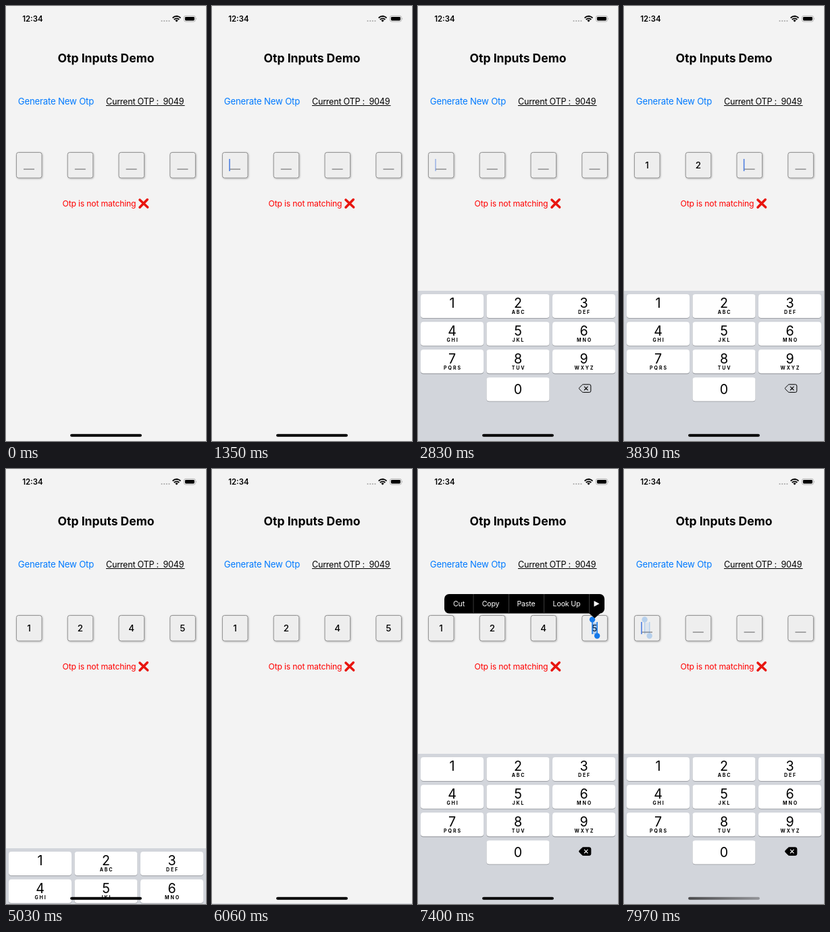
Write an HTML page that moves like this. It is 296 by 640 pixels and loops after 8000 ms.

```html
<!DOCTYPE html>
<html lang="en">
<head>
<meta charset="utf-8">
<title>Otp Inputs Demo</title>
<style>
  html, body { margin: 0; width: 100%; height: 100%; overflow: hidden; background: #f3f3f3; }
  svg { display: block; width: 296px; height: 640px; font-family: Inter, "Open Sans", sans-serif; }
  text { white-space: pre; }
  .mid { text-anchor: middle; }
</style>
</head>
<body>
<svg id="stage" viewBox="0 0 296 640" xmlns="http://www.w3.org/2000/svg">
  <defs>
    <filter id="soft" x="-20%" y="-20%" width="150%" height="150%">
      <feDropShadow dx=".8" dy=".8" stdDeviation=".9" flood-color="#000" flood-opacity=".28"/>
    </filter>
    <linearGradient id="dim">
      <stop offset="0" stop-color="#4a4a4c"/>
      <stop offset="1" stop-color="#939498"/>
    </linearGradient>
  </defs>
  <rect width="296" height="640" fill="#f3f3f3"/>

  <g id="status">
    <text x="24.2" y="23" font-size="11.4" font-weight="600">12:34</text>
    <g fill="#a9a9a9">
      <circle cx="230.5" cy="22" r="1.1"/><circle cx="234.2" cy="22" r="1.1"/>
      <circle cx="237.8" cy="22" r="1.1"/><circle cx="241.4" cy="22" r="1.1"/>
    </g>
    <g fill="none" stroke="#000" stroke-width="1.9">
      <path d="M246.6 17.6a8 8 0 0 1 11.8 0"/>
      <path d="M248.8 20a5 5 0 0 1 7.4 0"/>
    </g>
    <path d="M252.5 23.6l-2.1-2.2a3 3 0 0 1 4.2 0z"/>
    <rect x="263.4" y="14.4" width="17" height="8.6" rx="2.6" fill="none" stroke="#a6a6a6" stroke-width=".8"/>
    <rect x="264.9" y="15.9" width="14" height="5.6" rx="1.4"/>
    <path d="M281.4 17.2q1.6 1.5 0 3z" fill="#a6a6a6"/>
  </g>

  <text class="mid" x="148" y="83" font-size="17.5" font-weight="700">Otp Inputs Demo</text>
  <text x="17.8" y="145" font-size="13.2" letter-spacing="-.19" fill="#007aff">Generate New Otp</text>
  <text x="148" y="145" font-size="12.6" letter-spacing="-.25">Current OTP :  9049</text>
  <rect x="148" y="146" width="116.5" height="1"/>
  <text x="83.5" y="295" font-size="12.2" letter-spacing="-.17" fill="#f00">Otp is not matching</text>
  <path d="M198 285.2l11.6 10.8M209.2 284.8l-11.2 11.4" stroke="#e8150f" stroke-width="3.6" stroke-linecap="round"/>

  <g id="boxes"></g>

  <rect id="caret" y="225" width="1.6" height="18" fill="#4f7fe0"/>
  <g id="sel" fill="#1579ea">
    <rect x="258" y="226" width="7" height="17" opacity=".3"/>
    <rect x="257.2" y="222" width="1.5" height="21"/>
    <rect x="264.4" y="225" width="1.5" height="20"/>
    <circle cx="258" cy="221.5" r="4.2"/>
    <circle cx="265.1" cy="245.5" r="4.2"/>
  </g>

  <g id="menu">
    <rect x="39" y="184" width="237" height="28.5" rx="7"/>
    <path d="M253 212h17l-8.5 7.5z"/>
    <path d="M82 184v28.5M134.5 184v28.5M186.5 184v28.5M253.5 184v28.5" stroke="#484848" stroke-width=".8"/>
    <g class="mid" fill="#fff" font-size="10.6" letter-spacing="-.15">
      <text x="60.5" y="202">Cut</text>
      <text x="107.5" y="202">Copy</text>
      <text x="160" y="202">Paste</text>
      <text x="220" y="202">Look Up</text>
    </g>
    <path d="M260.5 194l8 4.3-8 4.3z" fill="#fff"/>
  </g>

  <g id="board">
    <rect y="419" width="296" height="221" fill="#d2d5db"/>
    <g id="keys"></g>
    <path id="erase" d="M244.4 556.8h9.2q2.2 0 2.2 2.2v7.2q0 2.2-2.2 2.2h-9.2q-.9 0-1.5-.7l-4-4.1q-.9-1 0-2l4-4.1q.6-.7 1.5-.7z" stroke="#000"/>
    <path id="cross" d="M246.3 560.2l4.8 4.8M251.1 560.2l-4.8 4.8" stroke-width="1.1" stroke-linecap="round"/>
  </g>
  <rect id="home" x="95.1" y="629.8" width="105.8" height="3.9" rx="1.95"/>
</svg>
<script>
const LOOP = 8000, BOARD_H = 221, PITCH = 75.8;
// Moments at which the screen refreshes; it holds still between them.
const TICKS = [0, 1350, 1460, 1570, 1680, 1790, 1900, 2170, 2290, 2830, 2950,
  3190, 3320, 3440, 3700, 3830, 4190, 4290, 4820, 4930, 5030, 5130, 5240, 5360,
  6060, 6200, 6310, 6430, 6530, 6640, 7400, 7520, 7630, 7740, 7850, 7970];

const $ = id => document.getElementById(id);
function add(parent, tag, attrs, text) {
  const el = document.createElementNS("http://www.w3.org/2000/svg", tag);
  for (const k in attrs) el.setAttribute(k, attrs[k]);
  if (text) el.textContent = text;
  return parent.appendChild(el);
}
const fade = (el, v) => el.setAttribute("opacity", v);

// Typed value, time it appears, time it is erased
const fields = [["1", 3320, 7850], ["2", 3830, 7740], ["4", 4290, 7630], ["5", 4930, 7520]]
  .map(([value, on, off], i) => {
    const g = add($("boxes"), "g", { transform: `translate(${15 + PITCH * i} 215)` });
    add(g, "rect", { x: .4, y: .4, width: 37.6, height: 37.6, rx: 3.2, fill: "#eeeeee",
      stroke: "#8f8f8f", filter: "url(#soft)" });
    const dash = add(g, "rect", { x: 11, y: 24.5, width: 16, height: 1.2, fill: "#78787a" });
    const digit = add(g, "text", { x: 19, y: 23.5, class: "mid", "font-size": 13.4,
      "font-weight": 500 }, value);
    return { on, off, dash, digit };
  });

const LETTERS = ["", "ABC", "DEF", "GHI", "JKL", "MNO", "PQRS", "TUV", "WXYZ"];
const keys = {};
function addKey(label, col, row, letters) {
  const x = 4 + 97.5 * col, y = 424 + 40.8 * row, mid = x + 46.5;
  const box = { x, y, width: 93, height: 35, rx: 4 };
  add($("keys"), "rect", { ...box, y: y + .8, fill: "#8d9095" });
  add($("keys"), "rect", { ...box, fill: "#fff" });
  keys[label] = add($("keys"), "rect", { ...box, fill: "#b4b9c3", opacity: 0 });
  add($("keys"), "text", { x: mid, y: y + (label === "0" ? 24.2 : 20), class: "mid",
    "font-size": 19.6 }, label);
  if (letters) add($("keys"), "text", { x: mid + 1, y: y + 29.2, class: "mid", "font-size": 7,
    "font-weight": 700, "letter-spacing": 1.9 }, letters);
}
LETTERS.forEach((s, i) => addKey(String(i + 1), i % 3, Math.floor(i / 3), s));
addKey("0", 1, 3);

// Key, pressed at, released at, settled at
const presses = [["1", 3190, 3440, 3700], ["2", 3700, 3830, 4190],
  ["4", 4190, 4290, 4820], ["5", 4820, 4930, 5030]];

function spring(ms) {
  const x = Math.max(0, ms) / 50;
  return 1 - (1 + x) * Math.exp(-x);
}
function boardShown(t) {
  if (t < 4820) return spring(t - 1350);
  if (t < 6060) return 1 - spring(t - 4923);
  return Math.max(1 / BOARD_H, spring(t - 6230));
}

// Value of the last [time, value] pair reached
const at = (t, pairs) => pairs.reduce((v, [s, next]) => t >= s ? next : v, 0);

function draw(now) {
  const t = TICKS.filter(s => s <= now).pop();

  for (const f of fields) {
    const filled = t >= f.on && t < f.off;
    fade(f.digit, filled ? 1 : 0);
    fade(f.dash, filled ? 0 : 1);
  }

  const caret = at(t, [[1350, 1], [2170, .5], [2290, 0], [2830, .5], [2950, 1],
    [3320, 0], [3830, 1], [4190, .5], [4290, 0], [7850, 1]]);
  const caretBox = t >= 3830 && t < 7000 ? 2 : 0;
  $("caret").setAttribute("x", 25.2 + PITCH * caretBox);
  fade($("caret"), caret);

  const back = at(t, [[7520, 1], [7630, 2], [7740, 3]]);
  $("sel").setAttribute("transform", `translate(${-PITCH * back} 0)`);
  fade($("sel"), at(t, [[6310, 1], [7850, .6], [7970, .25]]));
  fade($("menu"), at(t, [[6310, .6], [6430, 1], [7520, .4], [7630, 0]]));

  for (const [key, down, up, end] of presses)
    fade(keys[key], at(t, [[down, 1], [up, .02], [end, 0]]));
  const erasing = t >= 7400;
  $("erase").setAttribute("fill", erasing ? "#000" : "none");
  $("cross").setAttribute("stroke", erasing ? "#fff" : "#000");

  const drop = Math.round(BOARD_H * (1 - boardShown(t)));
  $("board").setAttribute("transform", `translate(0 ${drop})`);
  $("home").setAttribute("fill", t >= 7970 ? "url(#dim)" : "#000");
}

const start = performance.now();
function frame() {
  draw((performance.now() - start) % LOOP);
  requestAnimationFrame(frame);
}
frame();
</script>
</body>
</html>
```
